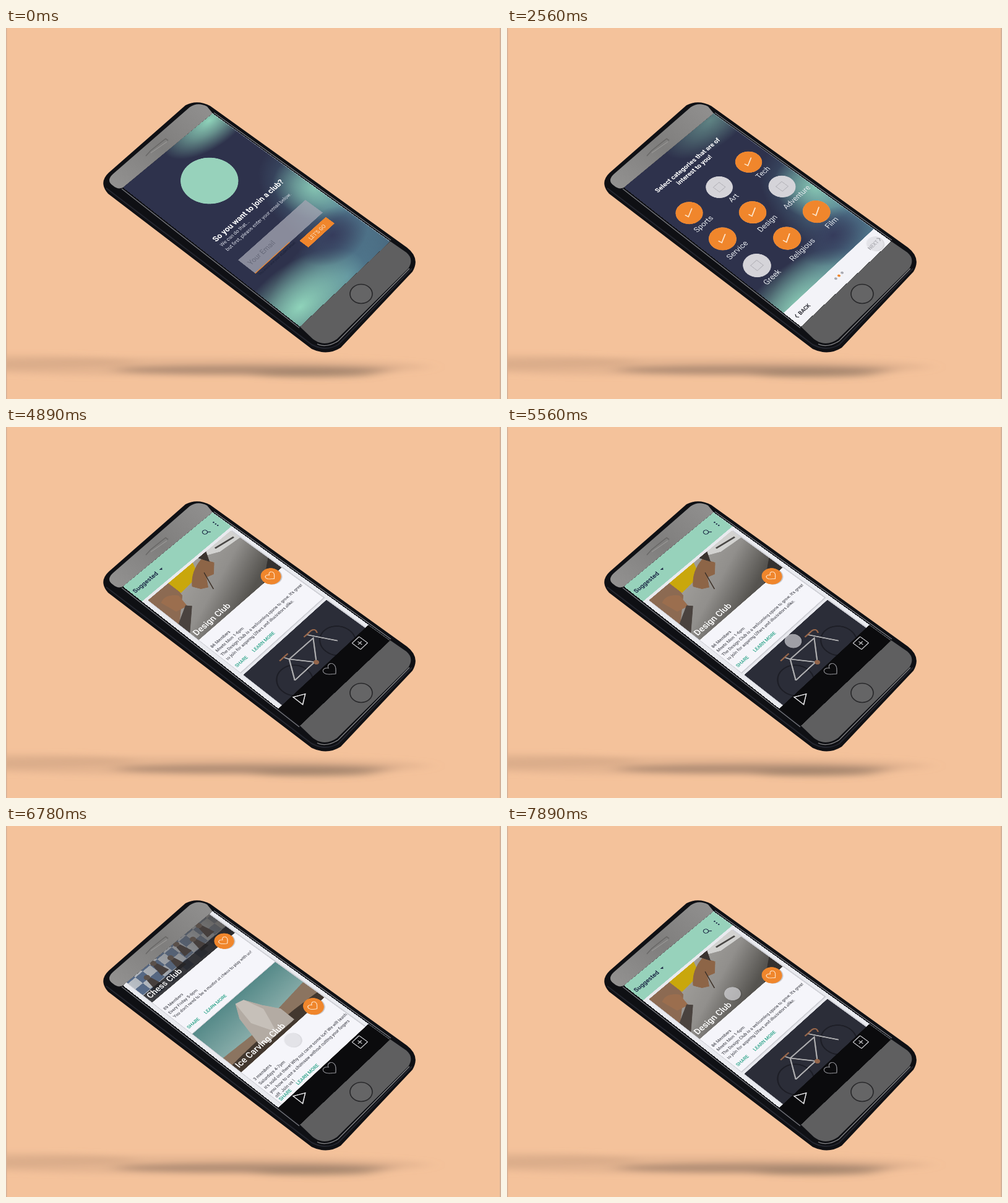
Animation of 800 by 600 pixels, one loop 8 s. Source, as an HTML page:

```html
<!DOCTYPE html>
<html lang="en">
<head>
<meta charset="utf-8">
<title>Club finder on a phone</title>
<style>
html, body { margin: 0; width: 100%; height: 100%; overflow: hidden; background: #f4c29b; }
svg { position: absolute; left: 0; top: 0; }
#screen { transform-origin: 0 0; font-family: Roboto, Arial, sans-serif; }
.b { font-weight: 700; }
.m { font-weight: 500; }
.c { text-anchor: middle; }
</style>
</head>
<body>
<svg width="800" height="600" viewBox="0 0 800 600">
  <defs>
    <filter id="soft" x="-20%" y="-200%" width="140%" height="500%"><feGaussianBlur stdDeviation="16 5"/></filter>
    <linearGradient id="top" x1="0" y1="1" x2="1" y2="0">
      <stop offset="0" stop-color="#949392"/><stop offset=".5" stop-color="#7f7e7d"/><stop offset="1" stop-color="#929190"/>
    </linearGradient>
  </defs>
  <rect width="800" height="600" fill="#f4c29b"/>
  <g filter="url(#soft)">
    <ellipse cx="290" cy="548" rx="390" ry="15" fill="#c79c7c" opacity=".32"/>
    <ellipse cx="20" cy="540" rx="190" ry="11" fill="#c79c7c" opacity=".35"/>
    <ellipse cx="400" cy="553" rx="225" ry="8" fill="#8e7260" opacity=".56"/>
    <ellipse cx="500" cy="560" rx="100" ry="6" fill="#7d6656" opacity=".4"/>
  </g>
  <path d="M.5 0V600M799 0V600" stroke="#d3b097" stroke-width="2"/>
  <path d="M290 125Q309 115 330 126L648 355Q670 372 657 394L541 517Q519 531 494 519L165 268Q149 250 166 234Z" fill="#0f1014"/>
  <path d="M162 259L494 512Q517 524 537 512L656 389" fill="none" stroke="#23252e" stroke-width="2"/>
  <path d="M189 258L334 138L325 127Q310 119 297 128L173 236Q161 247 173 255Q181 262 189 258Z" fill="url(#top)"/>
  <path d="M475 483L621 345L647 363Q660 374 650 389L535 503Q515 517 496 503Z" fill="#5f5f60"/>
  <path d="M187 260L474 485M336 137L622 343" stroke="#75767c" stroke-width="1.4"/>
  <path d="M652 389L537 506Q518 518 503 511" fill="none" stroke="#88888b" stroke-width="1.2"/>
  <path d="M226 207L234 198L258 179L262 182" fill="none" stroke="#696867" stroke-width="1.6"/>
  <path d="M234 202L260 184" stroke="#a09f9d" stroke-width="1"/>
  <ellipse cx="574" cy="430" rx="18" ry="15.5" fill="#656566" stroke="#28282a" stroke-width="1.7"/>
</svg>
<svg id="screen" width="400" height="712" viewBox="0 0 200 356"></svg>
<script>
const LOOP = 8000;
const MINT = '#97d2bb', ORANGE = '#f0862c', NAVY = '#2e324c', GREEN = '#2fa58b';
const screen = document.getElementById('screen');

// Perspective that carries the flat screen onto the phone's four glass corners.
function project(el, w, h, [x0, y0], [x1, y1], [x2, y2], [x3, y3]) {
  const sx = x0 - x1 + x2 - x3, sy = y0 - y1 + y2 - y3;
  const ax = x1 - x2, ay = y1 - y2, bx = x3 - x2, by = y3 - y2, det = ax * by - bx * ay;
  const g = (sx * by - bx * sy) / det, k = (ax * sy - sx * ay) / det;
  el.style.transform = `matrix3d(${[
    (x1 - x0 + g * x1) / w, (y1 - y0 + g * y1) / w, 0, g / w,
    (x3 - x0 + k * x3) / h, (y3 - y0 + k * y3) / h, 0, k / h,
    0, 0, 1, 0, x0, y0, 0, 1].map(n => n.toFixed(9))})`;
}
project(screen, 400, 712, [189, 258], [334, 138], [621, 345], [475, 483]);

const text = (x, y, size, str, fill = '#fff', cls = '') =>
  `<text x="${x}" y="${y}" font-size="${size}" fill="${fill}" class="${cls}">${str}</text>`;
const rect = (x, y, w, h, fill, more = '') =>
  `<rect x="${x}" y="${y}" width="${w}" height="${h}" fill="${fill}" ${more}/>`;
const line = (d, stroke, width = 1, more = '') =>
  `<path d="${d}" fill="none" stroke="${stroke}" stroke-width="${width}" ${more}/>`;
const shape = (d, fill) => `<path d="${d}" fill="${fill}"/>`;
const circle = (x, y, r, fill, more = '') => `<circle cx="${x}" cy="${y}" r="${r}" fill="${fill}" ${more}/>`;
const glow = (id, color) => `<radialGradient id="${id}"><stop offset="0" stop-color="${color}"/>
  <stop offset=".45" stop-color="${color}" stop-opacity=".6"/><stop offset="1" stop-color="${color}" stop-opacity="0"/></radialGradient>`;
const blob = (x, y, rx, ry, id, more = '') =>
  `<ellipse cx="${x}" cy="${y}" rx="${rx}" ry="${ry}" fill="url(#${id})" ${more}/>`;
const heart = (x, y, s, color) =>
  line('M0 8C-5 4 -9 1 -9 -3C-9 -8 -3 -9 0 -4C3 -9 9 -8 9 -3C9 1 5 4 0 8Z', color, 1.1 / s, `transform="translate(${x} ${y}) scale(${s})"`);

const backdrop = rect(0, 0, 200, 356, NAVY) +
  blob(185, 6, 95, 48, 'mint', 'id="glowTop"') + blob(205, 265, 95, 150, 'blue') +
  blob(198, 212, 58, 66, 'mint', 'opacity=".85"') + blob(110, 350, 150, 80, 'blue') +
  blob(25, 335, 125, 66, 'mint') + blob(150, 288, 62, 44, 'navy');
const logo = circle(100, 87, 44, MINT);

const welcome = logo +
  text(24, 172, 12.7, 'So you want to join a club?', '#fff', 'b') +
  text(24, 184, 8.2, 'We can do that...', '#d5d8e2') +
  text(24, 195.5, 8.2, 'but first, please enter your email below.', '#d5d8e2') +
  rect(23, 217, 149, 34, '#a3a5b1', 'opacity=".78"') + text(29, 237, 11.4, 'Your Email', '#686b7b') +
  line('M23 250.5H171', ORANGE, 1.2, 'id="underline"') +
  text(25, 258, 5.4, 'You must use your student email', '#1d2238') +
  rect(110, 259.5, 59, 17, ORANGE) + text(139.5, 271, 8.4, "LET'S GO", '#fbe3cb', 'c');

const intro = logo +
  ['Did you know there are over', '1,500 student organizations', 'at the University of Michigan?']
    .map((s, i) => text(98, 155 + i * 11.2, 8, s, '#bcc2d0', 'c')).join('') +
  ["Don't Stress! We've created", 'a questionnaire so you can', 'find the perfect club to join.']
    .map((s, i) => text(98.5, 214.5 + i * 14.8, 13, s, '#fff', 'b c')).join('') +
  rect(30, 275, 142, 28, ORANGE) + text(101, 293, 10.5, 'SOUNDS GOOD !', '#fbe3cb', 'c') +
  text(101, 315.5, 5.4, 'I JUST WANT TO BROWSE ALL', '#c9dbe0', 'c');

const spot = i => [34 + i % 3 * 66, 105.5 + Math.floor(i / 3) * 68.3];
const TAPS = [0, 2, 4, 3, 7, 8];

function picker(id, names, dot, next) {
  const items = names.map((name, i) => {
    const [x, y] = spot(i);
    return `<g transform="translate(${x} ${y})">${circle(0, 0, 20.5, '#d5d4d9')}
      ${rect(-6.5, -6.5, 13, 13, 'none', 'stroke="#b6b5bb"')}
      <g id="${id}${i}">${circle(0, 0, 20.5, ORANGE)}${line('M-7 -2L-6 4L9 -3', '#fde3c8', 1.7)}</g>
      ${text(0, 33.5, 12.3, name, '#e3e7ec', 'c')}</g>`;
  }).join('');
  const dots = [0, 1, 2].map(i => circle(95 + i * 7, 339.5, 2.1, i == dot ? ORANGE : '#a9aab2')).join('');
  return text(98, 45, 11, 'Select categories that are of', '#fff', 'b c') +
    text(98, 58.5, 11, 'interest to you!', '#fff', 'b c') + items +
    rect(0, 323.5, 200, 33, '#f3f3f8') + dots +
    line('M10 337L7.5 340.5L10 344', '#33343c', 1.2) + text(14, 343.5, 8.4, 'BACK', '#33343c', 'b') + next;
}
const nextLabel = text(177, 344, 8, 'NEXT', '#55565e', 'm c') + line('M189.5 337L192 340.5L189.5 344', '#33343c', 1.2);
const finishLabel = text(180, 343.5, 6.4, 'FINISH', '#55565e', 'm c') + line('M192 338L194 341L192 344', '#33343c');

const photos = {
  desk: rect(0, 0, 184, 106, 'url(#desk)') + shape('M0 0H50L42 32L0 66Z', '#8c6a52') +
    shape('M44 0H98L86 24L44 27Z', '#c9a70c') + shape('M64 31Q84 9 112 5L121 24L104 39L92 35L80 50L70 44Z', '#8d6547') +
    shape('M10 18Q26 10 38 28L33 51L14 46Z', '#9b6e4e') + shape('M112 0H184V20L142 16Z', '#d2d2d0') +
    shape('M110 0L128 0L117 18Z', '#3a332f') + line('M142 6L178 12', '#4a4846', 3) + line('M96 26L83 58', '#3d3128', 1.5) +
    shape('M0 64L32 48L38 56L0 88Z', '#4a433f') + shape('M184 78V106H142Z', '#34312f'),
  bike: rect(0, 0, 184, 106, '#2b2d38') +
    [44, 139].map(x => circle(x, 60, 26, 'none', 'stroke="#1d1e26" stroke-width="2"')).join('') +
    line('M44 60L66 30L118 31L89 62L66 30M44 60H89M63 23L66 30M139 60L116 20', '#aeaeb0', 2) +
    line('M54 22H72M110 20H126Q134 22 129 29', '#97664a', 2.2) + circle(89, 62, 4, '#93664c'),
  chess: rect(0, 0, 184, 106, '#b9bfc6') +
    Array.from({ length: 36 }, (_, i) => rect(i % 6 * 32 + (i / 6 & 1) * 16, Math.floor(i / 6) * 16 + 5, 16, 16, '#566b8a')).join('') +
    rect(0, 0, 184, 106, 'url(#shade)') +
    [28, 54, 80, 105, 130, 156].map((x, i) => `<g transform="translate(${x} ${76 - i % 2 * 12})">` +
      shape('M-8 16L-4 -6H4L8 16Z', '#463f3d') + circle(0, -10, 5, '#5a504a') + '</g>').join('') +
    rect(0, 86, 184, 20, 'rgba(30,30,34,.8)'),
  ice: rect(0, 0, 184, 106, 'url(#sky)') + shape('M0 62L70 66L184 56V106H0Z', '#8b7460') + shape('M0 80Q90 74 184 84V106H0Z', '#43382f') +
    shape('M54 84L68 32L84 9L98 13L110 40L124 64L123 92L64 91Z', '#b3aba3') + shape('M84 9L98 13L106 46L88 88L74 50Z', '#c6c0b9')
};

// A club card whose picture is `h` tall; everything else hangs from the picture's lower edge.
function card(y, h, photo, title, lines) {
  const base = y + h;
  return rect(7, y + 1, 187, h + 84, '#cfd0d6') + rect(8, y, 184, h + 83, '#f5f5fa') +
    `<svg x="8" y="${y}" width="184" height="${h}">${photo}</svg>` +
    text(11, base - 7, 14, title, '#fff', 'm') +
    circle(169.5, base + .5, 15.5, 'rgba(0,0,0,.18)') + circle(168.5, base - 1, 15.5, ORANGE) +
    heart(168.5, base - 1, .85, '#fde3c8') +
    lines.map((s, i) => text(11, base + 24.5 + i * 10.4, 7.1, s, '#5b5c64', 'm')).join('') +
    text(11, base + 74, 7.6, 'SHARE', GREEN, 'm') + text(48, base + 74, 7.6, 'LEARN MORE', GREEN, 'm');
}

const feed = rect(0, 0, 200, 356, '#e9eaef') + '<g id="list">' +
  rect(0, 0, 200, 41, MINT) + text(4, 23, 10.5, 'Suggested', '#20304a', 'b') + shape('M61 18H67L64 21.5Z', '#20304a') +
  circle(162.5, 18.5, 4, 'none', 'stroke="#20304a" stroke-width="1.2"') + line('M165.5 21.5L169 25', '#20304a', 1.4) +
  [15, 19.5, 24].map(y => circle(186, y, 1.3, '#20304a')).join('') +
  card(46, 106, photos.desk, 'Design Club', ['86 Members', 'Meets Mon 1-6pm',
    "The Design Club is a welcoming space to grow. It's great", 'to join for aspiring UXers and illustrators alike.']) +
  card(241, 106, photos.bike, 'Cycling Club', ['42 Members', 'Sundays 9-11am', 'Join us for a weekly ride around the town!']) +
  card(431, 105, photos.chess, 'Chess Club', ['89 Members', 'Every Friday 5-6pm', "You don't need to be a master at chess to play with us!"]) +
  card(620, 98, photos.ice, 'Ice Carving Club', ['3 members', 'Saturdays 4-7pm',
    "It's sold out there! Why not carve some ice? We will teach", 'you how to use a chainsaw without cutting your fingers', 'off. Join us !']) +
  '</g>' + rect(0, 315.5, 200, 40.5, '#0b0b0d') +
  line('M29 318L45 327L29 336Z', '#e6e6e8', 1.4) + heart(101, 327, 1.15, '#8d8d92') +
  rect(158, 319, 16, 16, 'none', 'stroke="#c9c9cd" stroke-width="1.2" rx="1"') + line('M166 323V331M162 327H170', '#c9c9cd', 1.2);

const shared = '<use href="#backdrop"/>';
const pages = [
  { id: 'welcome', start: -1000, body: `<g id="backdrop">${backdrop}</g>` + welcome },
  { id: 'intro', start: 880, body: shared + intro },
  { id: 'first', start: 1620, body: shared + picker('a',
    ['Sports', 'Art', 'Tech', 'Service', 'Design', 'Adventure', 'Greek', 'Religious', 'Film'], 1, nextLabel) },
  { id: 'second', start: 2690, body: shared + picker('b',
    ['Books', 'Knitting', 'Non-Profit', 'Science', 'Computers', 'Hockey', 'Football', 'Fashion', 'Photography'], 2, finishLabel) },
  { id: 'feed', start: 4480, body: feed }
];

screen.innerHTML = `<defs>${glow('mint', '#8fd3ba')}${glow('blue', '#568398')}${glow('navy', '#363c5c')}
  <linearGradient id="desk" x2=".6" y2="1"><stop offset="0" stop-color="#a9a7a3"/><stop offset=".6" stop-color="#918f8c"/><stop offset="1" stop-color="#55534f"/></linearGradient>
  <linearGradient id="shade"><stop offset="0" stop-color="#55565c" stop-opacity="0"/><stop offset="1" stop-color="#55524f" stop-opacity=".85"/></linearGradient>
  <linearGradient id="sky" x2="0" y2="1"><stop offset="0" stop-color="#568a89"/><stop offset=".6" stop-color="#86aba8"/></linearGradient></defs>` +
  pages.map(p => `<g id="${p.id}">${p.body}</g>`).join('') +
  line('M199.5 0V356', 'rgba(205,212,222,.45)') +
  `<g id="touch">${circle(1, 1.5, 13, 'rgba(0,0,0,.1)')}${circle(0, 0, 12.5, 'rgba(232,232,238,.62)')}</g>`;

const el = id => document.getElementById(id);
const clamp = n => Math.max(0, Math.min(1, n));
const ease = n => n * n * (3 - 2 * n);

// Eased value of column `col` in rows of [time, ...values].
function at(t, rows, col = 1) {
  const i = rows.findIndex(r => r[0] > t);
  if (i < 0) return rows[rows.length - 1][col];
  if (!i) return rows[0][col];
  const p = rows[i - 1], q = rows[i];
  return p[col] + (q[col] - p[col]) * ease((t - p[0]) / (q[0] - p[0]));
}

const taps = (start, step) => TAPS.map((i, n) => [start + n * step, ...spot(i), 1]);
const FIRST = taps(1800, 90), SECOND = taps(2980, 120);
const touchPath = [
  [350, 110, 300, 0], [550, 140, 270, 1], [1020, 142, 271, 1], [1350, 102, 289, 1], [1640, 102, 289, 1],
  ...FIRST, [2450, 180, 341, 1], [2750, 180, 341, 1],
  ...SECOND, [3850, 180, 341, 1], [4480, 180, 341, 1], [4620, 180, 341, 0], [5250, 101, 253, 0], [5400, 101, 253, 1],
  [5620, 101, 253, 1], [5920, 101, 110, 1], [6000, 101, 110, 0], [6080, 101, 253, 0], [6160, 101, 253, 1],
  [6440, 101, 110, 1], [6520, 101, 110, 0], [6620, 101, 253, 0], [6700, 101, 253, 1], [6860, 101, 253, 1],
  [6960, 101, 131, 1], [7280, 101, 260, 1], [7480, 102, 131, 1], [7700, 102, 131, 1]
];
const scrollPath = [[5620, 0], [6120, 195], [6160, 200], [6650, 481], [6960, 481], [7700, 0]];

function draw(now) {
  const t = now % LOOP;
  pages.forEach((p, i) => {
    const shown = clamp((t - p.start) / 90), next = pages[i + 1];
    el(p.id).setAttribute('opacity', shown);
    el(p.id).style.visibility = shown && !(next && t > next.start + 90) ? 'visible' : 'hidden';
  });
  // The shared backdrop lives in the first page but is reused by later ones.
  el('backdrop').style.visibility = 'visible';
  [['a', FIRST], ['b', SECOND]].forEach(([id, path]) => {
    for (let i = 0; i < 9; i++) {
      const n = TAPS.indexOf(i);
      el(id + i).setAttribute('opacity', n < 0 ? 0 : clamp((t - path[n][0]) / 70));
    }
  });
  el('underline').setAttribute('stroke-dasharray', 75 + 73 * clamp(t / 400) + ' 200');
  el('glowTop').setAttribute('opacity', at(t, [[1000, 1], [2500, .5], [3900, 1]]));
  el('list').setAttribute('transform', `translate(0 ${-at(t, scrollPath)})`);
  el('touch').setAttribute('transform', `translate(${at(t, touchPath)} ${at(t, touchPath, 2)})`);
  el('touch').setAttribute('opacity', at(t, touchPath, 3));
}

const begin = performance.now();
(function tick() {
  draw(performance.now() - begin);
  requestAnimationFrame(tick);
})();
</script>
</body>
</html>
```
